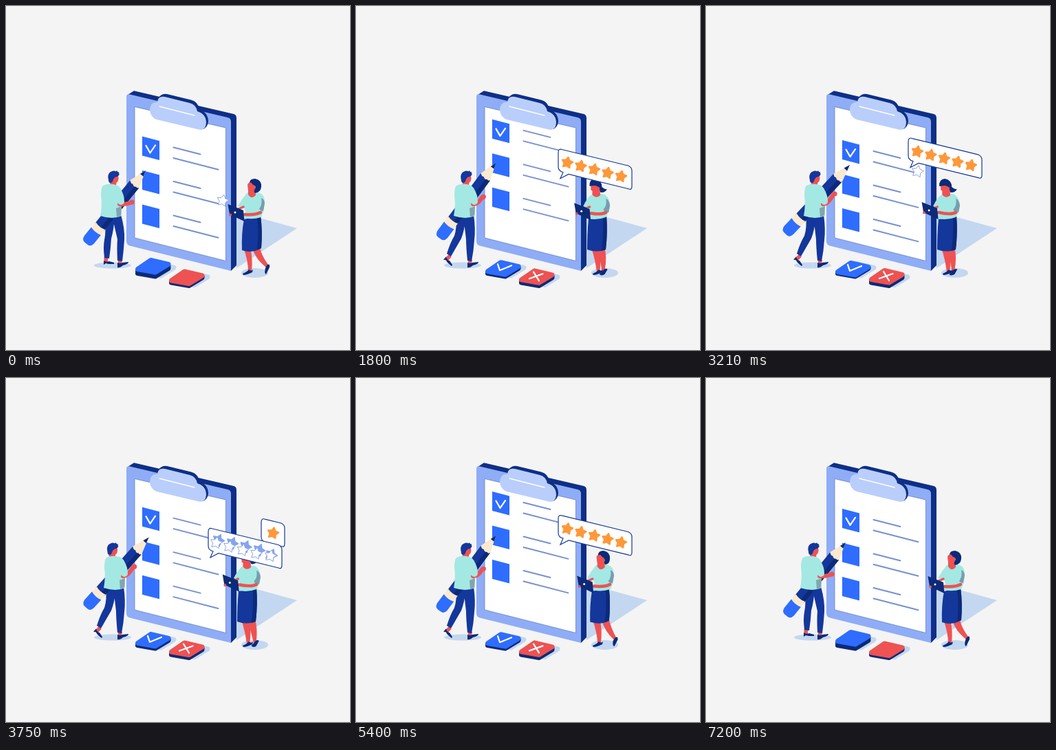
An HTML page for the animation above (7230 ms loop, 500x500 px).

```html
<!DOCTYPE html>
<html lang="en">
<head>
<meta charset="utf-8">
<title>Checklist and reviews</title>
<style>
html, body { margin: 0; width: 100%; height: 100%; overflow: hidden; background: #f4f4f4; }
svg { display: block; width: 100vw; height: 100vh; }
</style>
</head>
<body>
<svg viewBox="0 0 500 500">
  <g>
    <path fill="#c3d7f0" d="M330 299L372 309L423 323L335 381ZM128 377a27 4.6 0 1 0 54 0a27 4.6 0 1 0-54 0M342 388a19.500 7 0 1 0 39 0a19.500 7 0 1 0-39 0"/>
    <path fill="#0e2f86" d="M177 129L186 123.300L331 157Q335 158 335 163V377L327 385L300 340Z"/>
    <path fill="#8fadf6" d="M175 132Q175 127 180 128.500L322 162Q327 163 327 168V385L180 348.500Q175 347 175 342Z"/>
    <path fill="#fff" stroke="#6580c4" stroke-width=".8" d="M187 146.500L319.500 177V370.500L187 337Z"/>
  </g>
  <g id="rows"></g>
  <g>
    <path fill="#0e2f86" d="M220 139Q223 126 234 128L269 136.500Q279 139 281 150Q294 155 294 168Q293 177 286 179L230 150Z"/>
    <path fill="#b9cefb" d="M209 150Q210 139 220 139.500Q221 130 231 132L267 141Q276 143 278 153Q291 157 291 170Q290 182 280 179.500L219 165Q209 161 209 150Z"/>
    <path fill="none" stroke="#fff" stroke-width="1.300" stroke-linecap="round" d="M223 146L274 159"/>
  </g>
  <g id="scene"></g>
</svg>
<script>
const LOOP = 7230, BEAT = LOOP / 2, ROW_GAP = 49.5;
const NAVY = '#14379c', DARK = '#0c2a78', BLUE = '#2e6dff', RED = '#ee5253',
      MINT = '#a4e8e3', CREAM = '#fbe9d0', ORANGE = '#ff983a', PALE = '#c3d7f0';
const rowsLayer = document.getElementById('rows');
const sceneLayer = document.getElementById('scene');

const clamp = v => Math.max(0, Math.min(1, v));
const ramp = (t, from, to) => clamp((t - from) / (to - from));
const glide = (t, from, to) => { const v = ramp(t, from, to); return v * v * (3 - 2 * v); };
const lerp = (a, b, k) => a + (b - a) * k;
const backOut = u => 1 + 3.2 * (u - 1) ** 3 + 2.2 * (u - 1) ** 2;
// Rises from 0 to 1, holds, and falls back.
const plateau = (t, rise, top, fall, end) => glide(t, rise, top) * (1 - glide(t, fall, end));
// Cosine that repeats every beat.
const wave = (t, peak) => Math.cos(2 * Math.PI * (t - peak) / BEAT);

// Blends two path strings that share the same commands.
function mix(a, b, k) {
  const target = b.match(/-?[\d.]+/g);
  let i = 0;
  return a.replace(/-?[\d.]+/g, v => lerp(+v, +target[i++], k).toFixed(2));
}

const fill = (d, color, extra = '') => `<path d="${d}" fill="${color}" ${extra}/>`;
const dot = (x, y, r, color) => `<circle cx="${x}" cy="${y}" r="${r}" fill="${color}"/>`;
const group = (transform, content) => `<g transform="${transform}">${content}</g>`;
const line = (d, color, width, extra = '') => `<path d="${d}" fill="none" stroke="${color}" stroke-width="${width}"
  stroke-linecap="round" stroke-linejoin="round" ${extra}/>`;

// Stroke shown only between two fractions of its length.
const partLine = (d, color, width, to, from = 0) => to <= from ? '' :
  line(d, color, width, `pathLength="1" stroke-dasharray="${to - from} 9" stroke-dashoffset="${-from}"`);

/* ---------- checklist ---------- */
const CHECK_START = 1850, CHECK_TIME = 350;

function row(i, t) {
  const y = 189.5 + ROW_GAP * (i - t / BEAT);
  const age = i < 3 ? LOOP : t - 2560 - 3400 * (i - 3);
  if (age <= 0) return '';
  const fadeEnd = 2630 + BEAT * i;
  const opacity = 1 - ramp(t, fadeEnd - 460, fadeEnd);
  const checkStart = CHECK_START + BEAT * (i - 1);
  const box = fill('M-12.500-17L12.500-10.500V17.500L-12.500 11Z', BLUE);
  return `<g opacity="${opacity}" transform="translate(0 ${y})">
    ${group(`translate(210.5 17) scale(${backOut(ramp(age, 0, 480))})`, box)}
    ${partLine('M203.500 13.500L209.500 24L217 13', '#fff', 2.2, ramp(t, checkStart, checkStart + CHECK_TIME))}
    ${partLine('M243.500 16L282.500 26', '#7690d2', 2, 1 - (1 - ramp(age, 0, 320)) ** 2)}
    ${partLine('M243.500 31.500L308.500 48.300', '#7690d2', 2, ramp(age, 80, 360))}</g>`;
}

/* ---------- buttons ---------- */
const TILE = 'M-22 4.500L-3-8.500L22.500-2.500L3.500 9Z';
function button(x, base, lift, color, mark) {
  const tile = (dy, c) => group(`translate(${x} ${base + dy})`,
    fill(TILE, c, `stroke="${c}" stroke-width="7" stroke-linejoin="round"`));
  return group('translate(8 -1)', tile(0, PALE)) + tile(0, DARK) + tile(-lift / 2, DARK) + tile(-lift, color) +
    group(`translate(${x} ${base - lift})`, mark);
}

function buttons(t) {
  const active = plateau(t, 0, 850, 6200, 7150);
  const press = Math.max(0, wave(t, 2600));
  const mark = (d, start, end) => partLine(d, '#fff', 2.2, glide(t, start, start + 300), ramp(t, end, end + 235));
  const check = mark('M-7.500-6L-4.500 3L12.500-4', 250, 6550);
  const cross = mark('M-10.500 3L9-4', 400, 5980) + mark('M-4.500-7L3.500 6', 600, 6240);
  return button(213.5, 384, 6 - active * (2.8 + 2.4 * press), BLUE, check) +
    button(262.5, 397.5, 3 + active * (1 + press), RED, cross);
}

/* ---------- man with pencil ---------- */
function pencil(t, lean, lift) {
  const beatTime = t % BEAT;
  const stroke = ramp(beatTime, CHECK_START, CHECK_START + CHECK_TIME);
  const writing = plateau(beatTime, CHECK_START - 150, CHECK_START, CHECK_START + CHECK_TIME, CHECK_START + 650);
  const tipX = lerp(203 + lean * 6 * lift, 203.5 + 13.5 * stroke, writing);
  const tipY = lerp(239 - lean * (6 + 2 * lift), 236 - 10 * Math.abs(2 * stroke - 1), writing);
  const endX = 123 + lean * (4 - 4 * lift), endY = 337 - lean * (5 + 9 * lift);
  const angle = Math.atan2(tipY - endY, tipX - endX) * 180 / Math.PI;
  return group(`translate(${tipX} ${tipY}) rotate(${angle})`,
    fill('M-26-8.500H-106V8.500H-26Z', NAVY) +
    fill('M-26 2H-106V8.500H-26Z', DARK) +
    fill('M0 0L-25-8.500Q-29-5-27-2Q-30 2-27 4Q-29 7-25 8.500Z', CREAM) +
    fill('M0 0L-9-3V3Z', DARK) +
    fill('M-104-8.500H-117V8.500H-104Q-107 0-104-8.500Z', CREAM) +
    fill('M-114-9H-130Q-137-8-137-3V3Q-137 8-130 9H-114Q-117 0-114-9Z', BLUE));
}

function man(t) {
  const lean = plateau(t, 0, 850, 6200, 7150);
  const lift = .5 + .5 * wave(t, 3175);
  const sway = 5 * lean, nod = lean * (1.6 + 4 * wave(t, 2350));
  const handX = 183 + lean * (2 + 2 * lift), handY = 285 - lean * (7 + 5 * lift);
  const backLeg = mix('M143 304L158 304Q157 324 153 338Q152 354 150 367L143 366Q141 350 143 340Q146 326 143 304Z',
    'M145 304L161 304Q157 328 153 338Q146 350 138 364L132 360Q137 344 143 334Q147 322 145 304Z', lean);
  const frontLeg = mix('M154 304L167 303Q173 325 172 340Q171 356 169 371L162 370Q161 350 162 339Q158 322 154 304Z',
    'M156 304L171 303Q174 325 172 340Q171 356 168 371L162 370Q160 350 160 339Q158 322 156 304Z', lean);
  const backShoe = group(`translate(${lerp(146, 134, lean)} ${lerp(370, 367, lean)}) rotate(${42 * lean})`,
    fill('M-3.500-5H2V2H-3.500Z', RED) + fill('M-4 0Q0 3 4 1L11 3V5H3L-1 4L-4 6Z', DARK));
  const frontShoe = fill('M163 369L169 369L168 374H163Z', RED) +
    fill('M162 373Q166 375 169 373L178 372Q178 375 170 377Q165 381 162 380Z', DARK);
  const torso = fill('M141 261Q149 257 160 260Q168 262 168 275L168 305Q155 311 137 305Q140 290 138 275Q138 264 141 261Z', MINT) +
    fill('M168 291L160 294L161 307Q165 306 167 304Z', '#82a5ae');
  const head = fill('M151 253L161 253L160 261Q155 263 151 259Z', RED) +
    fill('M155 246Q163 245 163.500 249Q164 256 159 257L153 255Z', RED) +
    fill('M149 253Q146 241 157 239.500Q161 241 161 239Q162 240 162 241Q165 241 164 243Q166 245 162 248Q158 248 156 252Q155 257 152 257Q149 257 149 253Z', NAVY);
  const shoulder = 166 + sway;
  const arm = line(`M${shoulder - 1} 288Q${shoulder + 6} 289 ${handX - 2} ${handY + 1}`, RED, 6) +
    dot(handX, handY, 3.6, RED) +
    line(`M${shoulder - 4} 268Q${shoulder + 1} 276 ${shoulder + 1} 284`, MINT, 10);
  return backShoe + frontShoe + fill(backLeg, NAVY) + pencil(t, lean, lift) + fill(frontLeg, NAVY) +
    group(`translate(${nod} 0)`, head) + group(`translate(${sway} 0)`, torso) + arm;
}

/* ---------- woman with laptop ---------- */
function woman(t) {
  const turn = plateau(t, 0, 2000, 3000, 6150);
  const hips = plateau(t, 0, 950, 4400, 6150);
  const reach = -9 * plateau(t, 900, 2500, 3000, 6150);
  const leftLeg = mix('M345 351L355 351Q359 368 357 385L352 386Q352 370 345 351Z',
    'M342 351L354 351Q357 368 354 387L350 387Q348 370 342 351Z', hips);
  const rightLeg = mix('M358 352L369 351Q371 362 381 376L378 380Q362 367 358 352Z',
    'M350 352L361 351Q365 365 361 384L357 386Q355 368 350 352Z', turn);
  const leftShoe = fill('M344 389Q351 386 353 383Q356 386 359 383L358 387Q350 391 345 391Z', DARK);
  const rightShoe = mix('M377 381Q378 378 380 376Q384 374 383 380L378 390Q375 389 377 381Z',
    'M353 390Q358 386 360 383Q364 381 365 383L361 390Q356 393 353 390Z', turn);
  const skirt = mix('M346 310L370 305Q373 328 371 352Q358 360 343 355Q342 330 346 310Z',
    'M338 310L364 305Q366 328 363 354Q350 359 336 354Q336 330 338 310Z', hips);
  const skirtSide = mix('M365 307L370 305Q373 328 371 352L365 354Q368 330 365 307Z',
    'M359 307L364 305Q366 328 363 354L357 356Q360 330 359 307Z', hips);
  const torso = mix('M351 271Q361 267 371 273Q376 276 376 286L374 299L371 307Q358 311 346 308Q351 298 345 293L337 291Q343 280 351 271Z',
    'M341 275Q350 271 361 274Q368 278 369 289L367 299L363 307Q350 312 337 309Q341 299 336 294L330 291Q335 280 341 275Z', turn);
  const shade = mix('M371 279Q376 281 376 287L374 298Q370 298 368 295Q373 288 371 279Z',
    'M363 280Q368 282 369 290L367 300Q362 300 359 296Q365 290 363 280Z', turn);
  const neck = mix('M352 262L362 264L363 275Q357 282 352 274Z', 'M344 263L354 264L355 275Q349 281 343 274Z', turn);
  const face = mix('M351 260Q353 254 361 257L363 265Q357 273 352 268Z', 'M341 259Q346 254 355 257L356 267Q348 275 341 267Z', turn);
  const hair = mix('M354 257Q354 251 362 251Q372 253 371 263Q370 271 362 272Q359 269 363 264Q362 260 359 260Q356 255 354 257Z',
    'M339 262Q338 252 347 251Q357 253 357 263Q362 267 365 266Q362 272 355 271Q353 267 354 264Q349 261 347 261Q341 259 339 262Z', turn);
  const laptop = group(`translate(${reach} ${reach / 3})`,
    fill('M322.500 288L345 297L346.500 313L325 303Z', DARK) + dot(333, 300, 1.5, '#fff') + dot(326, 303.5, 2, RED));
  const elbow = lerp(371, 364, turn);
  const arms = line(`M${elbow - 1} 300Q${elbow - 8} 304 ${347 + reach} ${303 + reach / 3}`, RED, 4.5) +
    line(`M${345 + reach} 292L${338 + reach} 295`, RED, 3.5);
  return fill(leftLeg, RED) + fill(rightLeg, RED) + leftShoe + fill(rightShoe, DARK) + fill(skirt, NAVY) + fill(skirtSide, DARK) +
    fill(torso, MINT) + fill(shade, '#789eae') + fill(neck, RED) + fill(face, RED) + fill(hair, DARK) + arms + laptop;
}

/* ---------- review bubbles ---------- */
function star(x, y, r, color, edge, width, spin = 12) {
  let points = '';
  for (let i = 0; i < 10; i++) {
    const a = (i * 36 - 90 + spin) * Math.PI / 180, d = i % 2 ? r * .54 : r;
    points += `${(x + d * Math.cos(a)).toFixed(2)},${(y + d * Math.sin(a)).toFixed(2)} `;
  }
  return `<polygon points="${points}" fill="${color}" stroke="${edge}" stroke-width="${width}" stroke-linejoin="round"/>`;
}

function burst(x, y, p, reach) {
  if (p <= 0 || p >= 1) return '';
  let out = '';
  for (let i = 0; i < 16; i++) {
    const a = i * 2.4, d = reach * (.8 + .2 * Math.sin(i * 5.1)) * (1 - (1 - p) ** 2);
    out += dot(x + d * Math.cos(a), y + d * Math.sin(a), 1.1 - .4 * p, [ORANGE, RED, NAVY][i % 3]);
  }
  return out;
}

function bubbleShape(left, right, base) {
  const top = x => base + 1 + (x - 300) * .245, low = x => base + 58 + (x - 396) * .245;
  const tail = left < 297 ? `L309 ${low(309)}L297 ${base + 43}L301 ${base + 34}` : `L${left + 5} ${low(left + 5)}`;
  return `M${left} ${top(left) + 6}Q${left} ${top(left) - 1} ${left + 6} ${top(left + 6)}L${right - 5} ${top(right - 5)}
    Q${right} ${top(right) + 1} ${right} ${top(right) + 6}V${low(right) - 5}Q${right} ${low(right) + 1} ${right - 5} ${low(right - 5)}
    ${tail}Q${left} ${low(left) - 1} ${left} ${low(left) - 7}Z`;
}

function reviewStar(x, y, size, t, i) {
  const fillStart = 1000 + 130 * i;
  const gold = backOut(ramp(t, fillStart, fillStart + 260));
  const slide = plateau(t - 90 * i, 520, 580, 880, 940);
  let out = '';
  if (t < fillStart + 150) {
    if (slide) out += star(x + 2 * slide, y - 3 * slide, 9 * size, '#84a4f0', '#84a4f0', 1.5, 24);
    out += star(x - 2 * slide, y + 2 * slide, 9 * size, '#fff', '#8fa5e4', 1);
  }
  if (gold > 0) out += star(x, y, 8 * gold, ORANGE, ORANGE, 2.4 * gold);
  return out + burst(x, y, ramp(t, fillStart, fillStart + 270), 17);
}

function review(t) {
  if (t < 0 || t > 4340) return '';
  const rise = glide(t, 0, 420), open = glide(t, 420, 780), close = glide(t, 3400, 3700);
  const base = 263 - 45 * rise - .0114 * Math.max(0, t - 900);
  const left = lerp(294, 371, close), right = lerp(322, 401, open) + 4 * close;
  let out = open && fill(bubbleShape(left, right, base), '#fff', `stroke="${NAVY}" stroke-width="1.200"`) || '';
  for (let i = 0; i < 5; i++) {
    const x = 307 + 19.5 * i + 3 * close + (i ? 0 : 8 * (1 - rise));
    const size = i ? glide(t, 430 + 75 * i, 580 + 75 * i) : 1;
    if (size && x > left + 8) out += reviewStar(x, base + 20 + 5 * i, size, t, i);
  }
  const x = 388, y = base + 39;
  const pop = group(`translate(${x} ${y}) scale(${1 - ramp(t, 3930, 4080)}) translate(${-x} ${-y})`, out);
  return pop + burst(x, y, ramp(t, 3960, 4330), 24);
}

function draw(t) {
  rowsLayer.innerHTML = [0, 1, 2, 3, 4].map(i => row(i, t)).join('');
  sceneLayer.innerHTML = buttons(t) + man(t) + woman(t) + review(t) + review(t - 2850);
}

let start;
function frame(now) {
  start ??= now;
  draw((now - start) % LOOP);
  requestAnimationFrame(frame);
}
draw(0);
requestAnimationFrame(frame);
</script>
</body>
</html>
```
